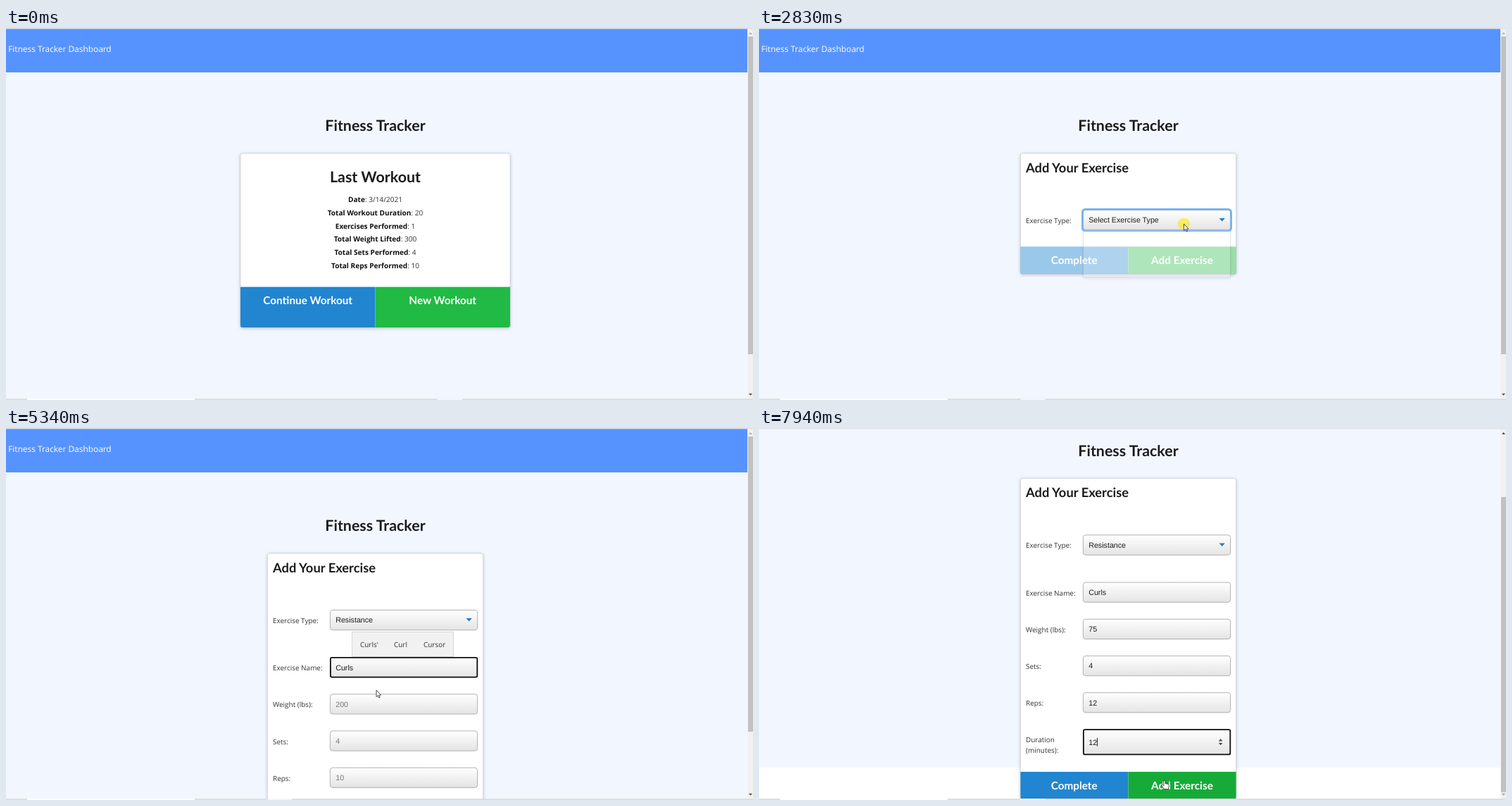
An HTML page for the animation above (8 s loop, 1061 px wide and 528 px high).

```html
<!DOCTYPE html>
<html lang="en">
<head>
<meta charset="utf-8">
<title>Fitness Tracker</title>
<style>
  html, body { margin: 0; width: 100%; height: 100%; overflow: hidden; background: #fff; }
  svg { display: block; width: 1061px; height: 528px; }
  text { text-rendering: geometricPrecision; white-space: pre; }
  .head { font: 700 21.4px Lato, sans-serif; fill: #1b1c1d; text-anchor: middle; }
  .sub { font: 700 18.34px Lato, sans-serif; fill: #1b1c1d; }
  .btn { font: 700 15.3px Lato, sans-serif; fill: #fff; text-anchor: middle; }
  .ui { font: 9.95px "Open Sans", "Noto Sans", sans-serif; fill: #333; }
  .row { font-size: 10.1px; text-anchor: middle; }
  .row tspan { font-weight: 700; fill: #111; }
  .val { font: 10.7px "Liberation Sans", Arial, sans-serif; fill: #1c1c1c; }
  .hint { fill: #777; }
  .card { fill: #fff; stroke: #d0d3d8; stroke-width: .8; filter: drop-shadow(0 1px 2px rgba(40, 50, 70, .3)); }
  .field { fill: url(#shade); stroke: #aaa; stroke-width: .9; }
  .ring { fill: none; stroke: #101010; stroke-width: 1.8; }
  .pop { fill: #fff; stroke: #767676; stroke-width: .9; filter: drop-shadow(0 2px 2px rgba(0, 0, 0, .35)); }
</style>
</head>
<body>
<svg viewBox="0 0 1061 528" id="stage"></svg>
<script>
const LOOP = 8000, FORM_AT = 1850, OPEN_AT = 2800, PICK_AT = 3860, SCROLL_AT = 6590, READY_AT = 7300;
const SCROLL = 106.5;

const stats = [['Date', '3/14/2021'], ['Total Workout Duration', 20], ['Exercises Performed', 1],
  ['Total Weight Lifted', 300], ['Total Sets Performed', 4], ['Total Reps Performed', 10]];

const fields = [
  { label: 'Exercise Name:', y: 325.2, hint: '', from: 4400, to: 5450,
    keys: [[4660, 'C'], [4800, 'Cu'], [4920, 'Cur'], [5060, 'Curl'], [5180, 'Curls']] },
  { label: 'Weight (lbs):', y: 377.4, hint: '200', from: 5450, to: 5900, num: true,
    keys: [[5640, '7'], [5750, '75']] },
  { label: 'Sets:', y: 429.6, hint: '4', from: 5900, to: 6260, num: true, keys: [[6060, '4']] },
  { label: 'Reps:', y: 481.8, hint: '10', from: 6260, to: SCROLL_AT, num: true,
    keys: [[6380, '1'], [6470, '12']] },
  { label: 'Duration', more: '(minutes):', y: 534, h: 36.5, hint: '10', from: SCROLL_AT, to: LOOP, num: true,
    keys: [[READY_AT, '1'], [7430, '12']] }
];

// time, x, y of the pointer
const path = [[190, 1011, 524], [240, 1031, 522], [450, 1031, 522], [1200, 578, 381], [1500, 606, 386.5],
  [2100, 606, 386.5], [2700, 603.5, 278], [2940, 603.5, 278], [3600, 545, 320.5], [3880, 545, 320.5],
  [4380, 530, 340], [4580, 530, 340], [5000, 526, 372], [5420, 526, 372], [5560, 526, 384],
  [7500, 526, 384], [7880, 576, 500], [LOOP, 576, 500]];
const clicks = [[1580, 1780], [2770, 2920], [3740, 3860], [4400, 4520]];

const rect = (x, y, w, h, fill, more = '') => `<rect x="${x}" y="${y}" width="${w}" height="${h}" fill="${fill}" ${more}/>`;
const box = (cls, x, y, w, h, r, more = '') => `<rect class="${cls}" x="${x}" y="${y}" width="${w}" height="${h}" rx="${r}" ${more}/>`;
const text = (cls, x, y, s, more = '') => `<text class="${cls}" x="${x}" y="${y}" ${more}>${s}</text>`;

const statRow = ([name, value], i) =>
  text('ui row', 524.5, 246.9 + 18.8 * i, `<tspan>${name}</tspan>: ${value}`);

function fieldRow(f, i) {
  const h = f.h || 29, mid = f.y + h / 2, base = f.more ? 552.6 : mid + 4.4;
  return text('ui', 379, base, f.label) + (f.more ? text('ui', 379, 567.7, f.more) : '') +
    box('field', 460.4, f.y + .4, 209.2, h - .8, 3.5) +
    `<path id="spin${i}" d="M652.8 ${mid - 1.3}h5.6l-2.8 -3.2zM652.8 ${mid + 1.3}h5.6l-2.8 3.2z" fill="#444"/>` +
    box('ring', 460.9, f.y + .6, 208.4, h - 1.2, 2, `id="ring${i}"`) +
    text('val', 468.2, mid + 3.8, '', `id="val${i}"`) +
    rect(468, mid - 6, .9, 12, '#111', `id="caret${i}"`);
}

const formButtons = `
  <g id="buttons"><g id="fade">
    <path d="M371.4 0h153.1v38.7h-150.1q-3 0 -3 -3z" fill="#2185d0"/>
    <path id="addBtn" d="M524.5 0h153.1v35.7q0 3 -3 3h-150.1z"/></g>
    ${text('btn', 447.7, 24.6, 'Complete')}${text('btn', 601, 24.6, 'Add Exercise')}
  </g>`;

document.getElementById('stage').innerHTML = `
  <defs><linearGradient id="shade" x2="0" y2="1">
    <stop stop-color="#fff"/><stop offset="1" stop-color="#e4e4e4"/></linearGradient></defs>
  ${rect(0, 0, 1061, 528, '#fff')}
  <g id="page">
    ${rect(0, 0, 1053, 588.5, '#f2f7ff')}${rect(0, 0, 1053, 63, '#5693ff')}
    ${text('ui', 3.2, 34, 'Fitness Tracker Dashboard', 'style="font-size:11.9px;fill:#fff"')}
    ${text('head', 524.5, 146, 'Fitness Tracker')}
    <g id="home">
      ${box('card', 333, 178, 383, 247, 3)}
      ${text('head', 524.5, 219, 'Last Workout')}${stats.map(statRow).join('')}
      <path d="M333 367.5h191.5v57.5h-188.5q-3 0 -3 -3z" fill="#2185d0"/>
      <path id="newBtn" d="M524.5 367.5h191.5v54.5q0 3 -3 3h-188.5z"/>
      ${text('btn', 428.7, 392.4, 'Continue Workout')}${text('btn', 620.2, 392.4, 'New Workout')}
    </g>
    <g id="form">
      ${box('card', 371.4, 178, 306.2, 171, 3, 'id="card"')}
      ${text('sub', 379, 204.5, 'Add Your Exercise')}
      ${text('ui', 379, 276.8, 'Exercise Type:')}
      ${box('field', 460.4, 258.4, 209.2, 28.4, 3.5)}
      ${box('ring', 459.4, 257.2, 211.2, 30.8, 4, 'id="glow" style="stroke:#6fb0f3;stroke-width:2.6"')}
      ${text('val', 468.2, 276, '', 'id="type"')}
      <path d="M653.6 270h8.2l-4.1 4.5z" fill="#1b7fc2"/>
      <g id="fields">${fields.map(fieldRow).join('')}</g>
      ${formButtons}
      <g id="words">
        ${box('', 491.5, 289.5, 144, 35, 0, 'fill="#f1f1f1" stroke="#cfcfcf" stroke-width=".8"')}
        ${text('ui', 503, 310.8, "Curls'")}${text('ui', 551, 310.8, 'Curl')}${text('ui', 593, 310.8, 'Cursor')}
      </g>
      <g id="popup">
        ${box('pop', 460.5, 286.3, 209, 67.4, 0)}
        <g id="options">
          ${rect(461, 308.6, 208, 22.4, '#1e90ff', 'id="mark"')}
          ${text('val hint', 469, 300.9, 'Select Exercise Type')}
          ${text('val', 469, 323.3, 'Resistance', 'id="opt"')}${text('val', 469, 345.7, 'Cardio')}
        </g>
      </g>
    </g>
  </g>
  ${rect(1053, 0, 8, 528, '#f1f1f1')}${rect(1054, 12, 7, 451, '#c1c1c1', 'id="thumb"')}
  <path id="up" d="M1055 9h5l-2.5 -3z"/><path id="down" d="M1055 518.8h5l-2.5 3z"/>
  ${rect(0, 0, 1061, 1.4, '#dfe1e5')}
  ${rect(0, 526, 1061, 2, '#dededc')}${rect(30, 526, 238, 2, '#fff')}
  ${rect(613, 526, 35, 2, '#f3f5f8', 'id="tab"')}
  <g id="status">
    <path d="M-1 510.5h88q3 0 3 3v12.5h-91z" fill="#dee1e6" stroke="#c9ccd1" stroke-width=".7"/>
    ${text('ui', 84, 521.4, 'localhost:3000/exercise', 'style="font-size:7.9px;fill:#4a4d51;text-anchor:end"')}
  </g>
  <g id="mouse">
    <circle id="press" r="8.6" fill="#ffe900" fill-opacity=".58"/>
    <path id="arrow" d="M0 0V9.6L2.2 7.6L3.8 11L5.2 10.3L3.7 7.1H6.6Z" fill="#fff" stroke="#222" stroke-width=".8"/>
    <path id="hand" d="M-1.1 1a1.1 1.1 0 0 1 2.2 0V4.6l4 .8q1.6 .4 1.4 2l-.6 3V12.6H-1.6V11L-4.4 7.4q-.3 -1.6 1.2 -1.3l2.1 1.7Z"
      fill="#fff" stroke="#222" stroke-width=".8"/>
    <path id="beam" d="M-2.6 -5h2l.6 .6l.6 -.6h2M0 -4.4V4.4M-2.6 5h2l.6 -.6l.6 .6h2" fill="none" stroke="#222" stroke-width=".9"/>
  </g>`;

const $ = id => document.getElementById(id);
const set = (id, name, value) => $(id).setAttribute(name, value);
const show = (id, on) => { $(id).style.display = on ? '' : 'none'; };
const within = (v, a, b) => v >= a && v < b;

function pointer(t) {
  const i = path.findIndex(p => p[0] > t);
  if (i < 1) return path[0].slice(1);
  const [t0, x0, y0] = path[i - 1], [t1, x1, y1] = path[i];
  const p = (t - t0) / (t1 - t0), k = p * p * (3 - 2 * p);
  return [x0 + (x1 - x0) * k, y0 + (y1 - y0) * k];
}

function drawField(f, i, t, x, y) {
  const key = f.keys.filter(k => k[0] <= t).pop();
  const focus = within(t, f.from, f.to);
  const hover = within(x, 460, 670) && within(y, f.y, f.y + (f.h || 29));
  const val = $('val' + i);
  val.textContent = key ? key[1] : f.hint;
  val.classList.toggle('hint', !key);
  show('ring' + i, focus);
  show('spin' + i, f.num && (focus || hover));
  const blink = focus && (t - f.from) % 1060 < 530;
  show('caret' + i, blink);
  if (blink) set('caret' + i, 'x', 468.2 + (key ? val.getComputedTextLength() : 0));
  return hover;
}

function draw(t) {
  const form = t >= FORM_AT, open = within(t, OPEN_AT, PICK_AT), full = t >= PICK_AT;
  const scroll = t >= SCROLL_AT ? SCROLL : 0, ready = t >= READY_AT;
  const [x, y] = pointer(t), py = y + scroll;

  show('home', !form);
  show('form', form);
  show('status', within(t, 1300, 2150));
  set('page', 'transform', `translate(0 ${-scroll})`);
  set('tab', 'x', form ? 371.5 : 613);
  set('thumb', 'y', scroll ? 98 : 12);
  set('thumb', 'height', full ? 419 : 451);
  set('up', 'fill', scroll ? '#505050' : '#b5b5b5');
  set('down', 'fill', scroll ? '#a3a3a3' : '#505050');

  const onNew = within(t, 1220, FORM_AT);
  set('newBtn', 'fill', onNew ? '#16ab39' : '#21ba45');

  show('glow', within(t, 2770, 4400));
  $('type').textContent = full ? 'Resistance' : 'Select Exercise Type';
  show('popup', open);
  set('popup', 'opacity', Math.min(1, Math.max(0, (t - OPEN_AT) / 150)));
  show('options', t >= 2880);
  const marked = t > 2940 && y > 308.6;
  show('mark', marked);
  $('opt').style.fill = marked ? '#fff' : '';

  show('fields', full);
  show('words', within(t, 4920, 5450));
  set('card', 'height', full ? 455 : 171);
  set('buttons', 'transform', `translate(0 ${full ? 594.5 : 310.3})`);
  const onField = fields.map((f, i) => drawField(f, i, t, x, py)).some(Boolean);
  const onAdd = ready && within(x, 524.5, 678) && py > 594.5;
  set('fade', 'opacity', .45 + .55 * Math.min(1, Math.max(0, (t - READY_AT) / 100)));
  set('addBtn', 'fill', onAdd ? '#16ab39' : '#21ba45');

  const hand = onNew || onAdd, beam = full && onField;
  show('mouse', t >= 190);
  set('mouse', 'transform', `translate(${x} ${y})`);
  show('press', clicks.some(([a, b]) => within(t, a, b)));
  show('hand', hand);
  show('beam', beam && !hand);
  show('arrow', !hand && !beam);
}

const start = performance.now();
function tick() {
  draw((performance.now() - start) % LOOP);
  requestAnimationFrame(tick);
}
tick();
</script>
</body>
</html>
```
